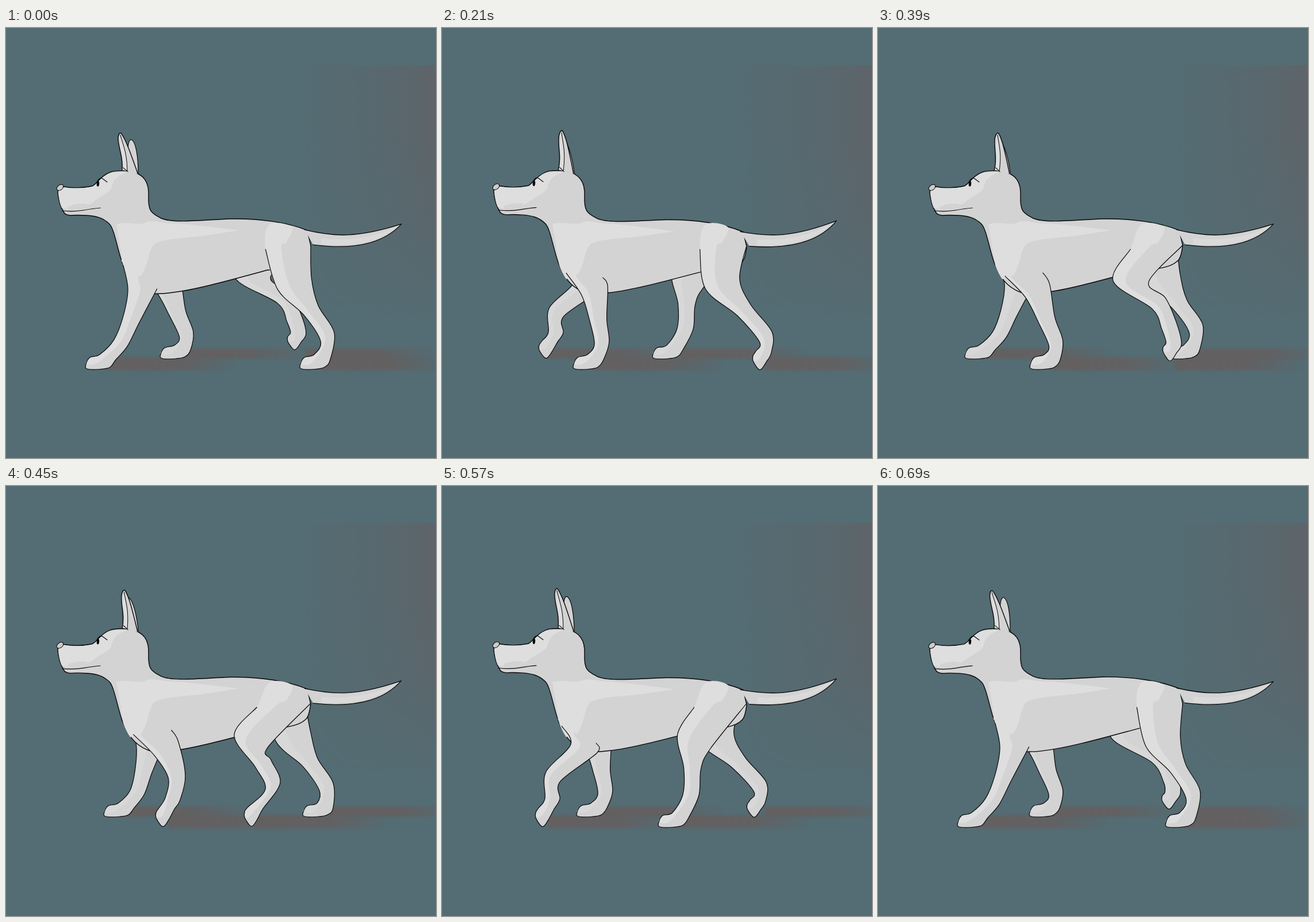
Animation of 748x748 px, one loop 720 ms. Source, as an HTML page with a canvas:

```html
<!DOCTYPE html>
<html lang="en">
<head>
<meta charset="utf-8">
<title>Walking dog</title>
<style>
html, body { margin: 0; width: 100%; height: 100%; overflow: hidden; background: #546c73; }
canvas { position: absolute; left: 0; top: 0; width: 748px; height: 748px; }
.glow {
  position: absolute; left: 520px; top: 65px; width: 228px; height: 440px; opacity: .62;
  background: linear-gradient(90deg, #655f6300, #655f6355 45%, #655f63aa 80%, #655f63);
  -webkit-mask-image: linear-gradient(#000 25%, #000a 65%, #0000);
  mask-image: linear-gradient(#000 25%, #000a 65%, #0000);
}
</style>
</head>
<body>
<div class="glow"></div>
<canvas width="748" height="748"></canvas>
<script>
const ctx = document.querySelector('canvas').getContext('2d');
const LOOP = 720, STEP = 30, TAU = 2 * Math.PI;
const BASE = '#d3d3d3', LIGHT = '#dedede', INK = '#080808';

// Horizontal travel of the joints through one stride
const KEYS = [0, 90, 210, 345, 390, 450, 570, 690];
const FORE_TOE = [139, 165, 229, 261, 265, 270, 172, 139];
const HIND_TOE = [512, 527, 550, 509, 505, 424, 377, 501];
const HIND_KNEE = [502, 511, 488, 441, 440, 426, 438, 496];
const HIND_HOCK = [559, 567, 563, 514, 506, 464, 433, 548];

// Paw outline around the toe, standing and hanging
const FLAT = [[24, -25], [7, -20], [0, -8], [2, 0], [26, .5], [42, -3], [52, -16]];
const HANG = [[-4, -31], [-9, -23], [-9, -14], [0, 0], [6, 0], [14, -12], [23, -29]];

const BODY = new Path2D(`M100 276 C118 279 136 278 150 275 C160 270 163 258 181 251
  Q190 247 216 249 C240 254 249 268 248 292 C247 318 252 322 270 331 C290 340 340 334 390 332
  C440 331 490 338 524 352 L530 378 C528 392 526 402 520 406 Q505 420 455 421
  C410 433 330 456 290 460 Q270 463 255 462 C230 455 215 440 204 413 C195 392 189 350 180 341
  C168 329 155 327 140 326 Q124 325 112 326 Q101 325 100 319 Q92 308 90 285 Q91 277 100 276Z`);
const SHOULDER = new Path2D(`M192 341 C215 336 225 343 240 340 C255 331 270 341 300 340
  Q350 345 405 352 L340 362 C300 366 270 368 258 376 C247 388 250 405 236 430 L216 437
  Q208 425 204 413Z`);
const FACE = new Path2D(`M100 277 C118 280 136 279 151 276 C161 271 164 259 181 252 L213 250
  C190 258 186 266 183 280 C176 290 160 295 150 304 Q140 311 107 315 L97 313 Q92 302 91 285Z`);
const CHIN = new Path2D('M107 311 Q122 304 142 306 Q134 314 108 315Z');
const MOUTH = new Path2D('M98 318 Q118 320 135 317 T164 313');
const BROW = new Path2D('M158 268 Q163 259 168 262 L176 268');
const TAIL = new Path2D('M520 351 C570 363 610 366 688 341 C662 369 618 388 534 377');
const TAIL_LIGHT = new Path2D('M548 366 Q620 374 680 346 C655 366 615 382 548 376Z');
const EAR_FAR = new Path2D('M212 250 C211 215 211 196 217 194 C226 196 230 225 230 254');
const EAR_NEAR = new Path2D('M202 247 C206 225 196 205 198 190 Q200 180 204 184 C211 195 216 210 229 253');
const EAR_LIGHT = new Path2D('M202 188 C206 205 212 215 211 249 L204 243 Q205 225 201 210Z');
const EAR_FOLD = new Path2D('M202 186 C206 205 212 215 211 249 L204 243');

const clamp = v => Math.max(0, Math.min(1, v));
const mix = (a, b, k) => [a[0] + (b[0] - a[0]) * k, a[1] + (b[1] - a[1]) * k];
const ramp = (t, from, to) => clamp((t - from) / (to - from));
const pulse = (t, from, to) => Math.sin(Math.PI * ramp(t, from, to)) ** 2;

// Smooth cyclic track through the values at KEYS
function track(values, t) {
  const n = KEYS.length;
  const at = i => values[(i + n) % n];
  const time = i => KEYS[(i + n) % n] + LOOP * Math.floor(i / n);
  let i = n - 1;
  while (KEYS[i] > t) i--;
  const span = time(i + 1) - time(i), u = (t - time(i)) / span;
  const slope = k => (at(k + 1) - at(k - 1)) / (time(k + 1) - time(k - 1)) * span;
  const d = at(i + 1) - at(i), a = slope(i), b = slope(i + 1);
  return at(i) + u * (a + u * (3 * d - 2 * a - b + u * (a + b - 2 * d)));
}

// Smooth path through points
function curve(pts, closed) {
  const path = new Path2D(), n = pts.length;
  const at = i => closed ? pts[(i + n) % n] : pts[Math.max(0, Math.min(n - 1, i))];
  path.moveTo(...pts[0]);
  for (let i = 0; i < n - (closed ? 0 : 1); i++) {
    const [a, b, c, d] = [at(i - 1), at(i), at(i + 1), at(i + 2)];
    path.bezierCurveTo(b[0] + (c[0] - a[0]) / 6, b[1] + (c[1] - a[1]) / 6,
      c[0] - (d[0] - b[0]) / 6, c[1] - (d[1] - b[1]) / 6, ...c);
  }
  return path;
}

function fill(path, color) {
  ctx.fillStyle = color;
  ctx.fill(path);
}

function ink(path, width = 1.2) {
  ctx.strokeStyle = INK;
  ctx.lineWidth = width;
  ctx.stroke(path);
}

function shape(path, width) {
  fill(path, BASE);
  ink(path, width);
}

function foreLeg(t) {
  const lift = ramp(t, 390, 450) * (1 - ramp(t, 570, 690));
  const toe = [track(FORE_TOE, t), 593 - 2 * lift - 9 * pulse(t, 450, 570)];
  const elbow = [190 + .33 * toe[0], 457], lag = elbow[0] - 236;
  const reach = 42 + .19 * (elbow[0] - toe[0]);
  const ankle = [toe[0] + reach + (20 - reach) * lift, toe[1] - 45 - 2 * lift];
  const wrist = mix(elbow, ankle, .5);
  wrist[0] -= 26 * lift * Math.sin((t - 480) / 60);
  wrist[1] += 5;
  return {
    lift, toe, chain: [[230, 390], elbow, wrist, ankle], widths: [24, 15, 13],
    top: [204 + .41 * lag, 413 + .45 * lag], end: [262 + .6 * lag, 455 - .7 * lag],
    lit: .3 + .15 * Math.cos(t / LOOP * TAU), cap: [[246, 400], [204, 402]]
  };
}

function hindLeg(t) {
  const lift = ramp(t, 100, 210) * (1 - ramp(t, 450, 570));
  const fold = pulse(t, 240, 480);
  const toe = [track(HIND_TOE, t), 593 - 18 * fold];
  const knee = [track(HIND_KNEE, t), 445 - 5 * fold];
  const hock = [track(HIND_HOCK, t), 537 - 20 * pulse(t, 210, 570)];
  const shin = mix(knee, hock, .5);
  shin[0] += 18 * fold;
  return {
    lift, toe, chain: [[490, 370], knee, shin, hock], widths: [31, 15, 14],
    top: [351 + .2 * knee[0], 385], end: [530, 378],
    lit: .35, cap: [[488, 372], [497, 346], [458, 342]]
  };
}

// Turns joints into the outline of a limb; the far side is moved and foreshortened
function buildLeg(leg, far, shift = 0) {
  const place = ([x, y]) => far ? [x + shift, 350 + (y - 350) * .925] : [x, y];
  const { chain, widths, toe, lift } = leg;
  const front = [leg.top], back = [leg.end];
  widths.forEach((w, i) => {
    const [x, y] = chain[i + 1], a = chain[i], b = chain[i + 2] || chain[i + 1];
    const len = Math.hypot(b[0] - a[0], b[1] - a[1]);
    const nx = (b[1] - a[1]) / len * w, ny = (a[0] - b[0]) / len * w;
    front.push([x - nx, y - ny]);
    back.push([x + nx, y + ny]);
  });
  const foot = FLAT.map((p, i) => {
    const [x, y] = mix(p, HANG[i], lift);
    return place([toe[0] + x, toe[1] + y]);
  });
  return { ...leg, far, front: front.map(place), back: back.map(place), foot };
}

function drawLeg({ front, back, foot, lit, cap, far }) {
  const outline = curve([...front, ...foot, ...[...back].reverse()], false);
  const middle = front.map((p, i) => mix(p, back[i], lit)).reverse();
  const sole = mix(foot[2], foot[6], .4);
  fill(outline, BASE);
  fill(curve([...front, ...foot.slice(0, 3), sole, ...middle, ...(far ? [] : cap)], true), far ? '#d8d8d8' : LIGHT);
  ink(outline);
}

function drawShadow({ toe, far, lift }) {
  const x = toe[0] + 36 - 24 * lift, len = 225;
  const g = ctx.createLinearGradient(x, 0, x + len, 0);
  g.addColorStop(0, 'rgba(101,95,95,.95)');
  g.addColorStop(.55, 'rgba(101,95,95,.85)');
  g.addColorStop(1, 'rgba(101,95,95,0)');
  ctx.fillStyle = g;
  ctx.fillRect(x, far ? 558 : 573, len, far ? 17 : 22);
}

// Leans and stretches an ear from its base line
function withEar(lean, rise, paint) {
  const base = 250, height = 66;
  ctx.save();
  ctx.translate(0, base);
  ctx.transform(1, 0, -lean / height, 1 + rise / height, 0, 0);
  ctx.translate(0, -base);
  paint();
  ctx.restore();
}

function drawEars(t, bob) {
  const sway = 6 * Math.sin(t / LOOP * TAU - TAU / 6);
  withEar(-5 - sway, 2 * bob, () => shape(EAR_FAR));
  withEar(2 + sway, 4 * bob, () => {
    shape(EAR_NEAR, 1.4);
    fill(EAR_LIGHT, LIGHT);
    ink(EAR_FOLD, 1);
  });
}

function drawHead() {
  const eye = new Path2D(), nose = new Path2D();
  eye.ellipse(160, 271, 2.2, 4.8, .1, 0, TAU);
  nose.ellipse(94, 277.5, 6.5, 4.3, -.65, 0, TAU);
  fill(FACE, LIGHT);
  fill(CHIN, BASE);
  ink(MOUTH);
  ink(BROW);
  fill(eye, INK);
  fill(nose, '#cfcaca');
  ink(nose, 1);
}

function drawBody(t) {
  const bob = (1 - Math.cos((t - 15) / LOOP * 2 * TAU)) / 2;
  ctx.save();
  // The rump sinks while the head stays up
  ctx.translate(230, 0);
  ctx.transform(1, .0095 * bob, 0, 1, 0, 0);
  ctx.translate(-230, 0);
  shape(BODY, 1.4);
  fill(SHOULDER, LIGHT);
  drawHead();
  drawEars(t, bob);
  ctx.translate(530, 365);
  ctx.rotate(-.064 * bob);
  ctx.translate(-530, -365);
  shape(TAIL, 1.3);
  fill(TAIL_LIGHT, '#dadada');
  ctx.restore();
}

function draw(t) {
  const other = (t + LOOP / 2) % LOOP;
  const far = [buildLeg(hindLeg(other), true, -10), buildLeg(foreLeg(other), true, 6)];
  const near = [buildLeg(hindLeg(t)), buildLeg(foreLeg(t))];
  ctx.clearRect(0, 0, 748, 748);
  ctx.lineJoin = ctx.lineCap = 'round';
  ctx.filter = 'blur(2px)';
  [...far, ...near].forEach(drawShadow);
  ctx.filter = 'none';
  far.forEach(drawLeg);
  drawBody(t);
  near.forEach(drawLeg);
}

const start = performance.now();
function tick(now) {
  const t = Math.max(0, now - start) % LOOP;
  draw(Math.floor(t / STEP) * STEP);
  requestAnimationFrame(tick);
}
draw(0);
requestAnimationFrame(tick);
</script>
</body>
</html>
```
